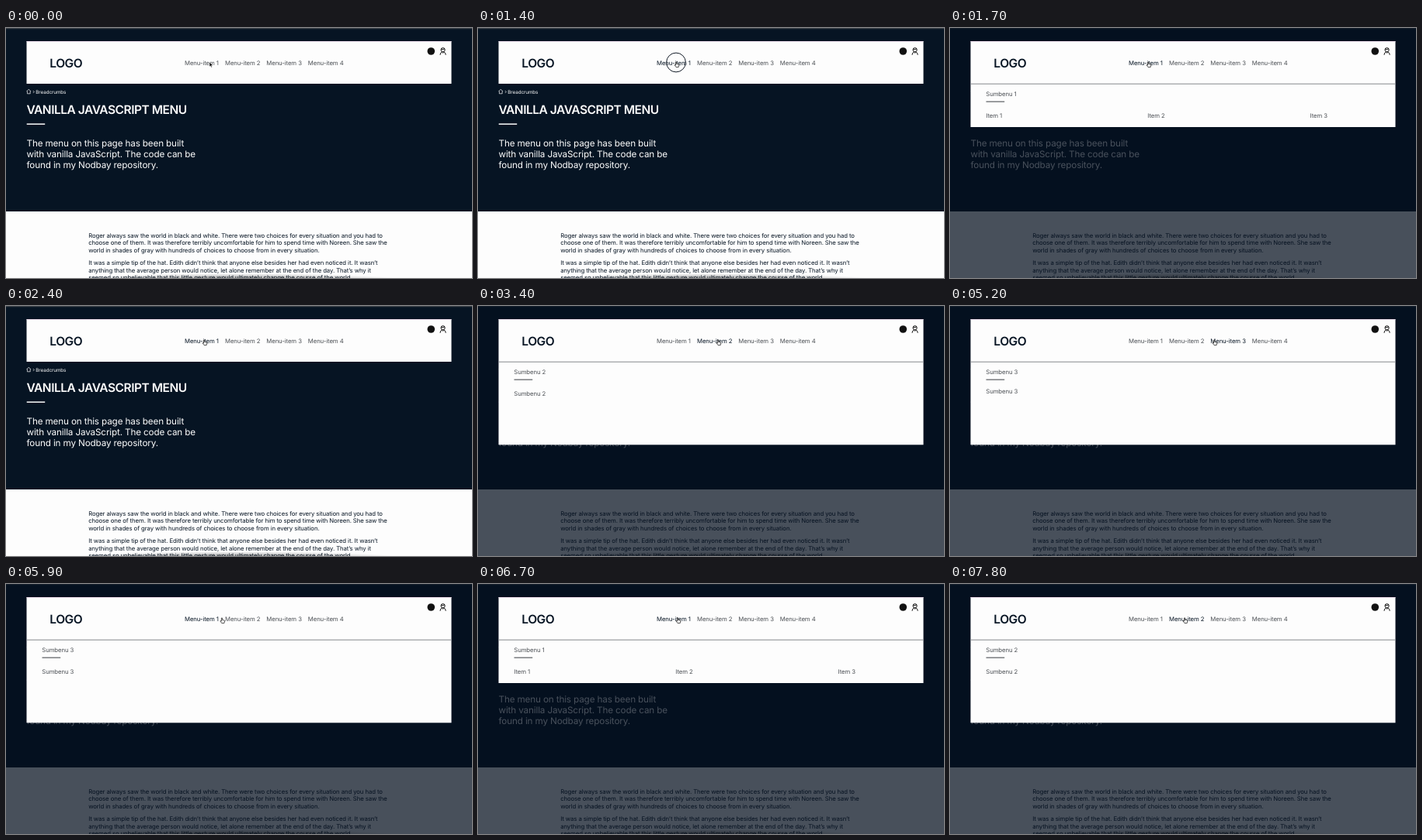
Recreate the animation shown at these times as an HTML page. Size 600x323 px, loop 8000 ms.

```html
<!DOCTYPE html>
<html lang="en">
<head>
<meta charset="utf-8">
<title>Vanilla JavaScript menu</title>
<style>
  html, body { margin: 0; height: 100%; overflow: hidden; background: #061423; }
  svg { display: block; width: 600px; height: 323px; }
  text {
    font-family: Inter, sans-serif;
    font-size: 7.75px;
    letter-spacing: -.012em;
    text-rendering: geometricPrecision;
    white-space: pre;
  }
  .title { font-size: 15.5px; font-weight: 600; letter-spacing: -.03em; }
  .lead { font-size: 11.7px; }
  .crumb { font-size: 6.3px; }
  .light { fill: #fdfdfd; }
  .dark { fill: #071524; }
  .grey { fill: #4b4f54; }
  .line { fill: none; stroke-linejoin: round; }
</style>
</head>
<body>
<svg viewBox="0 0 600 323">
  <defs>
    <radialGradient id="shade">
      <stop offset="0" stop-opacity=".4"/>
      <stop offset="1" stop-opacity="0"/>
    </radialGradient>
    <clipPath id="panelClip"><rect id="clipBox" x="26.5" y="72" width="547" height="0"/></clipPath>
  </defs>

  <rect width="600" height="323" fill="#061423"/>
  <rect width="600" height="1.2" fill="#3b4148"/>
  <rect y="237" width="600" height="86" fill="#fdfdfd"/>
  <path class="line" stroke="#fff" stroke-width=".7" d="M26.5 82 29.3 79.2 32.1 82M27.4 81.5V84.8H31.2V81.5M34.8 81 36.3 82.5 34.8 84"/>
  <text class="light crumb" x="38.3" y="84.8">Breadcrumbs</text>
  <text class="light title" x="26.4" y="111.3">VANILLA JAVASCRIPT MENU</text>
  <rect class="light" x="26.7" y="123.4" width="23.5" height="1.5"/>
  <g class="light" id="lead"></g>
  <g class="dark" id="story"></g>

  <rect id="overlay" width="600" height="323" fill="#030e1e"/>

  <g id="panel">
    <rect id="panelBox" x="26.5" y="72" width="547" fill="#fdfdfd"/>
    <g clip-path="url(#panelClip)">
      <text class="grey" id="heading" x="46.3" y="88"></text>
      <rect class="grey" x="46.5" y="94.6" width="23.7" height="1.1"/>
      <g class="grey" id="row"></g>
    </g>
  </g>

  <rect x="26.5" y="17" width="547" height="55" fill="#fdfdfd"/>
  <rect x="26.5" y="17" width="547" height=".8" fill="#f0dcef"/>
  <rect id="divider" x="26.5" y="71.7" width="547" height="1" fill="#85898d"/>
  <text class="dark title" x="56.3" y="50.6">LOGO</text>
  <g id="menu"></g>
  <circle cx="547.3" cy="30" r="4.8" fill="#111"/>
  <path class="line" stroke="#111" stroke-width="1" d="M560 28.2a2.6 2.6 0 1 1 5.2 0a2.6 2.6 0 1 1-5.2 0M560.2 27.4Q563 28 565 26.8M559 34.8Q559 31.6 561.5 31.2L562.6 32.4 563.7 31.2Q566.2 31.6 566.2 34.8"/>

  <ellipse cx="300" cy="325" rx="210" ry="8" fill="url(#shade)"/>
  <circle id="ring" class="line" r="12.4" stroke="#111a26" stroke-width="1"/>
  <g id="cursor" stroke-linejoin="round">
    <path id="arrow" fill="#000" stroke="#fff" stroke-width=".5" d="M-1-3V3L.4 1.8 1.3 3.9 2.3 3.4 1.4 1.4H3.2Z"/>
    <path id="hand" fill="#fff" stroke="#111" stroke-width=".7" d="M-1.4 1V-3Q-.8-3.8-.2-3V-.6L2.2-.1Q2.9.1 2.8 1L2.2 3.6H-1L-2.9.8Q-2.4 0-1.4 1Z"/>
  </g>
</svg>
<script>
const $ = id => document.getElementById(id);
const clamp = v => Math.min(1, Math.max(0, v));

function addText(parent, x, y, content, className = "") {
  const el = document.createElementNS("http://www.w3.org/2000/svg", "text");
  el.setAttribute("x", x);
  el.setAttribute("y", y);
  el.setAttribute("class", className);
  el.textContent = content;
  return parent.appendChild(el);
}

["The menu on this page has been built",
 "with vanilla JavaScript. The code can be",
 "found in my Nodbay repository."
].forEach((s, i) => addText($("lead"), 26.5, 152.5 + i * 14.3, s, "lead"));

["Roger always saw the world in black and white. There were two choices for every situation and you had to",
 "choose one of them. It was therefore terribly uncomfortable for him to spend time with Noreen. She saw the",
 "world in shades of gray with hundreds of choices to choose from in every situation.",
 "It was a simple tip of the hat. Edith didn’t think that anyone else besides her had even noticed it. It wasn’t",
 "anything that the average person would notice, let alone remember at the end of the day. That’s why it",
 "seemed so unbelievable that this little gesture would ultimately change the course of the world."
].forEach((s, i) => addText($("story"), 106.2, 271 + i * 9.25 + (i > 2 ? 7.7 : 0), s));

const items = [230, 282, 335.3, 388.8].map((x, i) => addText($("menu"), x, 47.7, "Menu-item " + (i + 1)));
const cells = [46.3, 254.3, 463.6].map(x => addText($("row"), x, 116, ""));

// Cursor stops: time, x, y
const stops = [
  [0, 263, 47], [200, 262, 40], [500, 264, 47], [600, 264, 47], [700, 280, 47], [900, 256, 47],
  [2500, 256, 47], [2800, 310, 47], [4400, 310, 47], [4500, 342, 47], [4700, 342, 47], [4800, 341, 47],
  [5600, 341, 47], [6000, 258, 47], [6700, 258, 47], [6850, 341, 47], [7300, 341, 47], [7450, 303, 47]
];
const clicks = [1400, 2300, 3000, 5000, 6100, 6900, 7500];
// Panel changes: time, submenu number (0 closes)
const changes = [[0, 0], [1450, 1], [2350, 0], [3050, 2], [4150, 0], [5050, 3], [6150, 1], [6950, 3], [7550, 2]];

function cursorAt(t) {
  const i = stops.findLastIndex(s => s[0] <= t);
  const a = stops[i], b = stops[i + 1] || a;
  const p = b === a ? 0 : (t - a[0]) / (b[0] - a[0]);
  return [a[1] + (b[1] - a[1]) * p, a[2] + (b[2] - a[2]) * p];
}

function drawPanel(t) {
  const i = changes.findLastIndex(c => c[0] <= t);
  const [start, n] = changes[i];
  const grow = clamp((t - start) / 150);
  const slide = clamp((t - start) / 300);
  const wasOpen = i > 0 && changes[i - 1][1] > 0;
  const height = (n === 1 ? 56 : 107.3) * grow;

  $("overlay").setAttribute("opacity", n ? 0.72 * (wasOpen ? 1 : grow) : 0);
  $("panel").style.display = $("divider").style.display = n ? "" : "none";
  $("panelBox").setAttribute("height", height);
  $("clipBox").setAttribute("height", height);
  $("heading").textContent = "Sumbenu " + n;
  $("row").setAttribute("transform", `translate(0 ${-12 * (1 - slide) ** 2})`);
  cells.forEach((cell, k) => {
    cell.textContent = n === 1 ? "Item " + (k + 1) : k ? "" : "Sumbenu " + n;
  });
}

function draw(t) {
  const [x, y] = cursorAt(t);
  const hover = t < 100 ? -1 : x < 281.5 ? 0 : x < 335 ? 1 : 2;
  items.forEach((item, i) => item.setAttribute("class", i === hover ? "dark" : "grey"));
  $("cursor").setAttribute("transform", `translate(${x} ${y})`);
  $("arrow").style.display = hover < 0 ? "" : "none";
  $("hand").style.display = hover < 0 ? "none" : "";
  $("ring").style.display = clicks.some(c => t >= c && t < c + 100) ? "" : "none";
  $("ring").setAttribute("cx", x - 1);
  $("ring").setAttribute("cy", y - 2.5);
  drawPanel(t);
}

// The screen updates ten times a second
function tick() {
  draw(Math.floor(performance.now() % 8000 / 100) * 100);
  requestAnimationFrame(tick);
}
tick();
</script>
</body>
</html>
```
